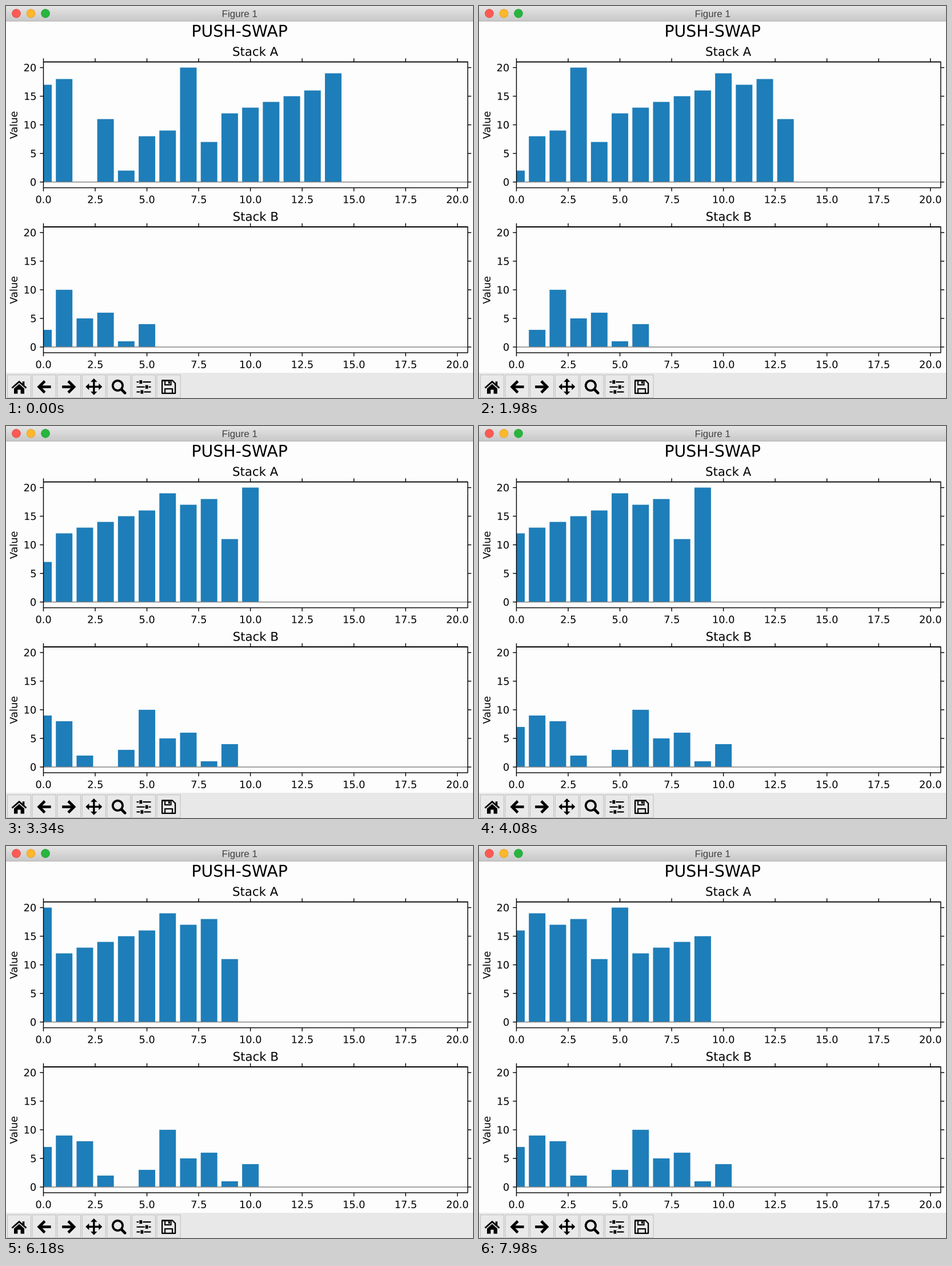
Animation, 817 px wide and 685 px high, one loop 8 s. Source, as a matplotlib script:

```python
import matplotlib.pyplot as plt
from matplotlib.animation import FuncAnimation
from matplotlib.collections import LineCollection, PolyCollection
from matplotlib.patches import Circle, PathPatch, Polygon, Rectangle
from matplotlib.textpath import TextPath
from matplotlib.transforms import Affine2D

plt.rcParams["path.snap"] = False

W, H, DPI = 817, 685, 128
STEP, LOOP = 20, 8000          # ms
OP_TIME, OP_LEAD = 420, 20     # ms between stack operations, offset of the first
PAGE, BAR, INK = "#fdfdfd", "#1e7eb9", "#000000"

LEFT, UNIT_X, UNIT_Y, X_MAX = 65.5, 36.21, 10, 20.5
RIGHT = LEFT + X_MAX * UNIT_X
PANEL_TOPS = {"A": 97.6, "B": 385.9}
TICK = 6.2

START_A = [17, 18, 0, 11, 2, 8, 9, 20, 7, 12, 13, 14, 15, 16, 19]
START_B = [3, 10, 5, 6, 1, 4]
OPS = ("ra ra pb ra pb pb pb ra pb ra ra " + "rra " * 8).split()


def pt(px):
    return px * 72 / DPI


def build_states():
    a, b = START_A[:], START_B[:]
    states = [(a[:], b[:])]
    for op in OPS:
        if op == "ra":
            a.append(a.pop(0))
        elif op == "rra":
            a.insert(0, a.pop())
        else:
            b.insert(0, a.pop(0))
        states.append((a[:], b[:]))
    return states


fig = plt.figure(figsize=(W / DPI, H / DPI), dpi=DPI, facecolor=PAGE)
ax = fig.add_axes([0, 0, 1, 1])
ax.set_xlim(0, W)
ax.set_ylim(H, 0)
ax.axis("off")


def label(x, y, text, px, align=0.5, color=INK, font="DejaVu Sans", turn=0):
    """Text as outlines, so that it can sit between whole pixels."""
    path = TextPath((0, 0), text, size=px, prop={"family": font})
    width = path.get_extents().x1 + 0.06 * px
    place = (Affine2D().translate(-align * width, 0).rotate_deg(turn)
             .scale(1, -1).translate(x, y))
    ax.add_patch(PathPatch(place.transform_path(path), fc=color, ec="none", zorder=5))


def stroke(points, px, join="miter", cap="butt", color=INK, z=5):
    xs, ys = zip(*points)
    ax.plot(xs, ys, color=color, lw=pt(px), solid_joinstyle=join,
            solid_capstyle=cap, zorder=z)


def fill(points, color=INK, z=5):
    ax.add_patch(Polygon(points, closed=True, fc=color, ec="none", zorder=z))


def box(x0, y0, x1, y1, color=INK, edge="none", px=0, z=5):
    ax.add_patch(Rectangle((x0, y0), x1 - x0, y1 - y0, fc=color, ec=edge,
                           lw=pt(px), zorder=z))


def title_bar():
    rows = [[(0, y), (W, y), (W, y + 1), (0, y + 1)] for y in range(26)]
    greys = [str((228 - 1.1 * y) / 255) for y in range(26)]
    ax.add_collection(PolyCollection(rows, facecolors=greys, edgecolors="none",
                                     antialiaseds=False, zorder=1))
    box(0, 26, W, 27, "#b2b2b2", z=2)
    lights = [("#fc5a54", "#e2463f"), ("#fdb72c", "#e0a023"), ("#27b53e", "#1ea032")]
    for i, (face, edge) in enumerate(lights):
        ax.add_patch(Circle((18 + 25.5 * i, 13), 7.3, fc=face, ec=edge,
                            lw=pt(0.8), zorder=3))
    label(408.8, 19.3, "Figure 1", 17, color="#404040", font="Liberation Sans")


def panel(name, top):
    bottom, zero = top + 220, top + 210
    bars = PolyCollection([], facecolors=BAR, edgecolors="none", zorder=2)
    ax.add_collection(bars)
    stroke([(LEFT, zero), (RIGHT, zero)], 1.42, color="#808080", z=3)
    lines = [[(LEFT, top), (RIGHT, top), (RIGHT, bottom), (LEFT, bottom),
              (LEFT, top), (RIGHT, top)]]
    for i in range(9):
        x = LEFT + 2.5 * i * UNIT_X
        lines += [[(x, top - TICK), (x, top)], [(x, bottom), (x, bottom + TICK)]]
        label(x, bottom + 26.8, f"{2.5 * i:.1f}", 17.73)
    for v in range(0, 21, 5):
        y = zero - v * UNIT_Y
        lines += [[(LEFT - TICK, y), (LEFT, y)], [(RIGHT, y), (RIGHT + TICK, y)]]
        label(LEFT - 2 * TICK, y + 6.5, str(v), 17.73, align=1)
    ax.add_collection(LineCollection(lines, colors=INK, linewidths=pt(1.42), zorder=4))
    label((LEFT + RIGHT) / 2, top - 10.5, f"Stack {name}", 21.28)
    label(19.8, top + 110.3, "Value", 17.73, turn=90)
    return bars, zero


def icon_home(x):
    stroke([(x - 12.5, 667.5), (x, 656.5), (x + 12.5, 667.5)], 2.8)
    box(x + 5.8, 656, x + 9.3, 664)
    fill([(x - 9, 668.5), (x, 660.5), (x + 9, 668.5), (x + 9, 677.5), (x + 2.6, 677.5),
          (x + 2.6, 670.5), (x - 2.6, 670.5), (x - 2.6, 677.5), (x - 9, 677.5)])


def icon_arrow(x, way):
    tip = x + way * 8.8
    stroke([(tip - way * 10, 655.5), (tip, 665.5), (tip - way * 10, 675.5)], 4.8)
    stroke([(tip, 665.5), (x - way * 12, 665.5)], 4.6)


def icon_move(x, y=665.3):
    stroke([(x - 10, y), (x + 10, y)], 3.4)
    stroke([(x, y - 10), (x, y + 10)], 3.4)
    for s in (-1, 1):
        fill([(x + s * 14.5, y), (x + s * 8.5, y - 5.8), (x + s * 8.5, y + 5.8)])
        fill([(x, y + s * 14.5), (x - 5.8, y + s * 8.5), (x + 5.8, y + s * 8.5)])


def icon_zoom(x):
    ax.add_patch(Circle((x - 2, 663.3), 8.6, fc="none", ec=INK, lw=pt(3.8), zorder=5))
    stroke([(x + 4.5, 670), (x + 10.8, 676.3)], 4.8, cap="round")


def icon_sliders(x):
    for y, knob in ((657, -5.2), (665.7, 5.2), (674.4, -3.2)):
        stroke([(x - 12.5, y), (x + knob - 3.6, y)], 2.2)
        stroke([(x + knob + 3.6, y), (x + 12.5, y)], 2.2)
        box(x + knob - 2.4, y - 3.1, x + knob + 2.4, y + 3.1)


def icon_save(x):
    stroke([(x - 11.5, 654.3), (x + 6.5, 654.3), (x + 11.5, 659.3), (x + 11.5, 676.8),
            (x - 11.5, 676.8), (x - 11.5, 654.3), (x, 654.3)], 2.3, join="round")
    stroke([(x - 6.5, 676.8), (x - 6.5, 669), (x + 6.5, 669), (x + 6.5, 676.8)], 2.1)
    stroke([(x - 6.5, 654.3), (x - 6.5, 662), (x + 4, 662), (x + 4, 654.3)], 2.1)
    box(x - 0.6, 655.5, x + 2.2, 660)


def toolbar():
    box(0, 641, W, H, "#e8e8e8", z=1)
    icons = [icon_home, lambda x: icon_arrow(x, -1), lambda x: icon_arrow(x, 1),
             icon_move, icon_zoom, icon_sliders, icon_save]
    for i, icon in enumerate(icons):
        x = 23 + 43.6 * i
        box(x - 20.5, 644.5, x + 20.5, 684.5, "#e9e9e9", "#bdbdbd", 1, z=2)
        icon(x)


title_bar()
label(409, 53.6, "PUSH-SWAP", 28.37)
panels = [panel(name, top) for name, top in PANEL_TOPS.items()]
toolbar()
STATES = build_states()


def bar_shapes(values, zero):
    shapes = []
    for i, v in enumerate(values):
        x0 = LEFT + max(0, i - 0.4) * UNIT_X
        x1 = LEFT + (i + 0.4) * UNIT_X
        y = zero - v * UNIT_Y
        shapes.append([(x0, zero), (x0, y), (x1, y), (x1, zero)])
    return shapes


def update(frame):
    done = (frame * STEP + OP_LEAD) // OP_TIME
    for (bars, zero), values in zip(panels, STATES[done]):
        bars.set_verts(bar_shapes(values, zero))
    return [bars for bars, _ in panels]


anim = FuncAnimation(fig, update, frames=LOOP // STEP, interval=STEP,
                     repeat=True, repeat_delay=0, blit=False)
plt.show()
```
